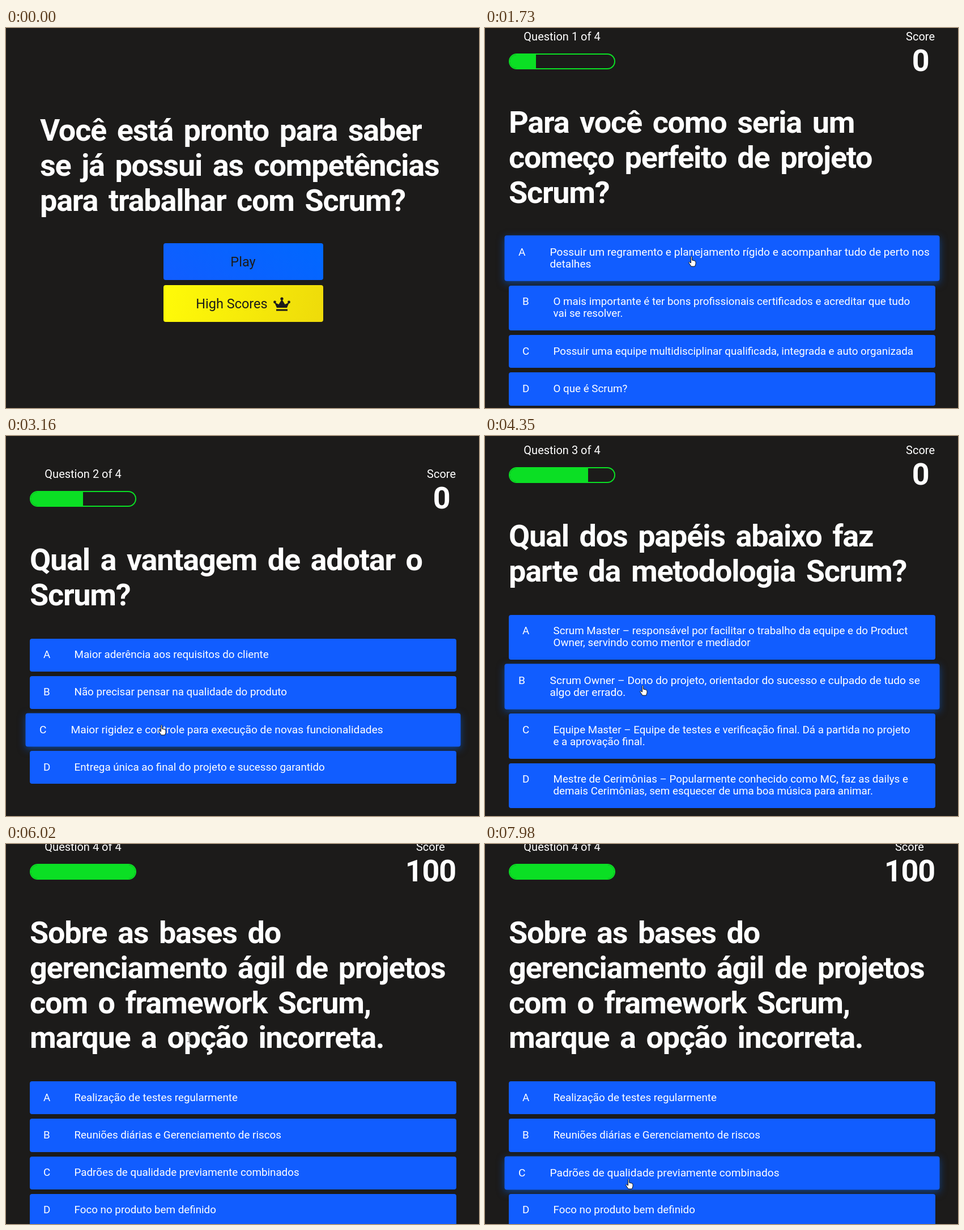
Animation of 835x671 px, one loop 8 s. Source, as an HTML page:

```html
<!DOCTYPE html>
<html lang="pt">
<head>
<meta charset="utf-8">
<title>Quiz Scrum</title>
<style>
html, body { margin: 0; width: 100%; height: 100%; overflow: hidden; background: #1c1b1a; }
body { position: relative; color: #fff; font: 18.8px/21.2px Roboto, sans-serif; white-space: pre; }
[hidden] { display: none !important; }
h1, .hit, .label, .bar, .score, #status, #cursor { position: absolute; box-sizing: border-box; }
h1, .score b { margin: 0; font: bold 54px/61.8px Roboto, sans-serif; letter-spacing: -1.25px; }
h1 { left: 42px; word-spacing: 6.5px; }
.btn { left: 277.5px; width: 282px; height: 65px; padding-top: 2px; border-radius: 4px; display: flex; gap: 10px;
  align-items: center; justify-content: center; color: #1c1b1a; font-size: 23.5px; }
.play { top: 380px; background: linear-gradient(32deg, #115dff, #0068ff); }
.high { top: 454px; background: linear-gradient(100deg, #fffb08, #eedb0a); }
.choice { left: 42px; width: 752.5px; padding: 18.5px 0 18.5px 78.5px; border-radius: 4px; background: #115dff; }
.choice i { position: absolute; left: 24px; font-style: normal; }
.wrong { background: linear-gradient(32deg, #e61d1d, #e00b0b); }
.right { background: linear-gradient(32deg, #0bdf24, #29e86f); }
.hover { transform: scale(1.02); box-shadow: 0 4px 14px rgba(6, 103, 247, .5); }
.btn.hover { transform: scale(1.03); }
.high.hover { box-shadow: 0 4px 14px rgba(240, 222, 10, .4); }
.label, .score { font-size: 20px; line-height: 24px; text-align: center; }
.label, .bar { left: 42px; width: 188px; }
.bar { height: 28px; border: 2px solid #0bdf24; border-radius: 14px; overflow: hidden; }
.bar div { height: 100%; background: #0bdf24; }
.score { right: 41px; }
.score b { display: block; }
#status { left: 0; top: 668px; width: 209px; height: 3px; background: #30373e; }
#cursor { left: 0; top: 0; width: 20px; height: 22px; overflow: visible; }
</style>
</head>
<body>
<section>
  <h1 style="left:60px;top:150px">Você está pronto para saber
se já possui as competências
para trabalhar com Scrum?</h1>
  <div class="btn hit play">Play</div>
  <div class="btn hit high">High Scores<svg width="30" height="25" fill="#1c1b1a"><circle cx="15" cy="3" r="2.6"/><circle cx="2.5" cy="9" r="2.4"/><circle cx="27.5" cy="9" r="2.4"/><path d="M2 9.5L6 19H24L28 9.5L20.5 13L15 4L9.5 13ZM5 21.5H25V24.5H5Z"/></svg></div>
</section>
<div id="status"></div>
<svg id="cursor">
  <path d="M4.5 1.5q0-1 1-1t1 1V7l4.5 1q2 .5 2 2.5v3l-1.5 4.5H5L1 12q-.8-1.5.5-2l3 2z" transform="translate(-5 0)" fill="#fff" stroke="#111"/>
  <path d="M-3-6H3M0-6V7M-3 7H3" fill="none" stroke="#777"/>
  <path d="M0 0V16L4 12L7 18L9 17L6.5 11.5H12Z" fill="#fff" stroke="#111"/>
</svg>
<script>
const quiz = [
  { top: 15, title: "Para você como seria um\ncomeço perfeito de projeto\nScrum?", choices: [
    "Possuir um regramento e planejamento rígido e acompanhar tudo de perto nos\ndetalhes",
    "O mais importante é ter bons profissionais certificados e acreditar que tudo\nvai se resolver.",
    "Possuir uma equipe multidisciplinar qualificada, integrada e auto organizada",
    "O que é Scrum?"] },
  { top: 67, title: "Qual a vantagem de adotar o\nScrum?", choices: [
    "Maior aderência aos requisitos do cliente",
    "Não precisar pensar na qualidade do produto",
    "Maior rigidez e controle para execução de novas funcionalidades",
    "Entrega única ao final do projeto e sucesso garantido"] },
  { top: 25, title: "Qual dos papéis abaixo faz\nparte da metodologia Scrum?", choices: [
    "Scrum Master – responsável por facilitar o trabalho da equipe e do Product\nOwner, servindo como mentor e mediador",
    "Scrum Owner – Dono do projeto, orientador do sucesso e culpado de tudo se\nalgo der errado.",
    "Equipe Master – Equipe de testes e verificação final. Dá a partida no projeto\ne a aprovação final.",
    "Mestre de Cerimônias – Popularmente conhecido como MC, faz as dailys e\ndemais Cerimônias, sem esquecer de uma boa música para animar."] },
  { top: 5, title: "Sobre as bases do\ngerenciamento ágil de projetos\ncom o framework Scrum,\nmarque a opção incorreta.", choices: [
    "Realização de testes regularmente",
    "Reuniões diárias e Gerenciamento de riscos",
    "Padrões de qualidade previamente combinados",
    "Foco no produto bem definido"] }
];
const starts = [0, 1410, 3160, 4290, 6020];
// screen, choice, time, result
const answers = [[1, 0, 2000, "wrong"], [2, 2, 3250, "wrong"], [3, 0, 4960, "right"]];
// first step, last step, step count, end point
const moves = [
  [800, 1340, 9, 364, 403],
  [2390, 2390, 1, 313, 490],
  [2460, 2530, 2, 306, 496],
  [2730, 2950, 4, 274, 510],
  [4350, 4350, 1, 278, 440],
  [4420, 4700, 5, 323, 342],
  [6680, 7390, 11, 257, 567],
  [7920, 7980, 2, 253, 591]
];

const lines = text => text.split("\n").length;
const cursor = document.getElementById("cursor");
const status = document.getElementById("status");

quiz.forEach(({ top, title, choices }, n) => {
  let y = top + 166.9 + 61.8 * lines(title);
  const rows = choices.map((text, i) => {
    const row = `<div class="hit choice" style="top:${y}px"><i>${"ABCD"[i]}</i>${text}</div>`;
    y += 45 + 21.2 * lines(text);
    return row;
  });
  const page = document.createElement("section");
  page.innerHTML = `<div class="label" style="top:${top - 12}px">Question ${n + 1} of 4</div>` +
    `<div class="bar" style="top:${top + 30}px"><div style="width:${25 * (n + 1)}%"></div></div>` +
    `<div class="score" style="top:${top - 12}px">Score<b>0</b></div>` +
    `<h1 style="top:${top + 121}px">${title}</h1>` + rows.join("");
  document.body.insertBefore(page, status);
});
const pages = [...document.querySelectorAll("section")];

function pointer(t) {
  let x = 400, y = 690;
  for (const [from, to, count, endX, endY] of moves) {
    if (t < from) break;
    const gap = (to - from) / (count - 1) || 1;
    const part = Math.min(1, (Math.floor((t - from) / gap + .001) + 1) / count);
    x += (endX - x) * part;
    y += (endY - y) * part;
  }
  return [x, y];
}

function draw() {
  const t = performance.now() % 8000;
  const now = starts.filter(s => t >= s).length - 1;
  const [x, y] = pointer(t);
  pages.forEach((page, i) => page.hidden = i !== now);

  let over = false;
  const hits = [...pages[now].querySelectorAll(".hit")];
  for (const el of hits) {
    const dx = x - el.offsetLeft, dy = y - el.offsetTop;
    const on = dx >= 0 && dx < el.offsetWidth && dy >= 0 && dy < el.offsetHeight;
    el.classList.toggle("hover", on);
    over = over || on;
  }
  for (const [screen, choice, time, result] of answers)
    if (screen === now) hits[choice].classList.toggle(result, t >= time);
  if (now) pages[now].querySelector("b").textContent = t >= 4960 ? 100 : 0;

  status.hidden = t < 1200 || t >= 1730;
  const shape = over ? 0 : now === 4 && y < 372 ? 1 : 2;
  [...cursor.children].forEach((p, i) => p.style.display = i === shape ? "" : "none");
  cursor.style.transform = `translate(${x}px, ${y}px)`;
  requestAnimationFrame(draw);
}
draw();
</script>
</body>
</html>
```
